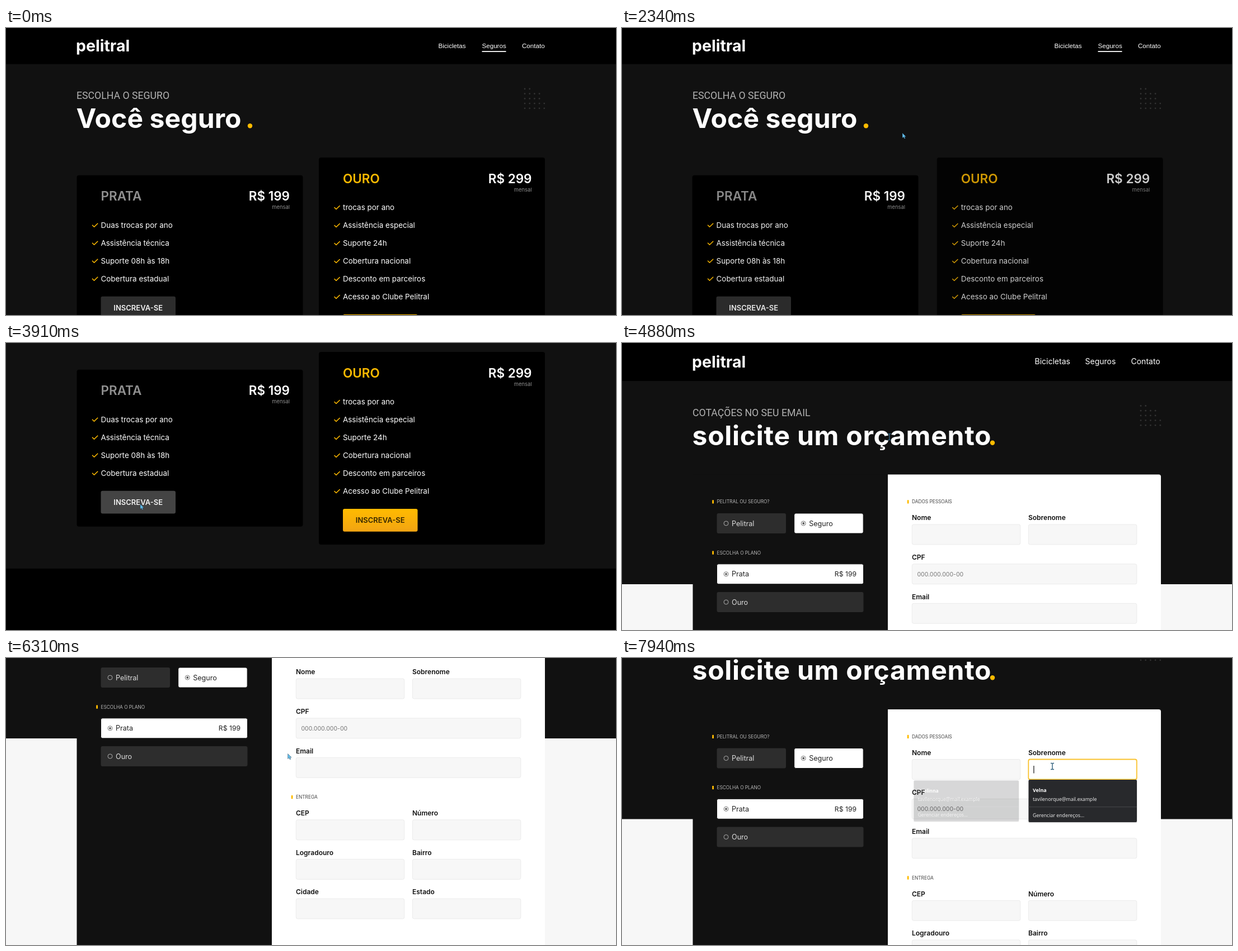
Animation, 1090 px wide and 514 px high, one loop 8 s. Source, as an HTML page:

```html
<!DOCTYPE html>
<html lang="pt-BR">
<head>
<meta charset="utf-8">
<title>Seguros</title>
<style>
html, body { margin: 0; width: 100%; height: 100%; overflow: hidden; background: #111; }
svg { display: block; width: 100%; height: 100%; }
text { font-family: Inter, "Open Sans", sans-serif; white-space: pre; }
.nav { font-family: "Liberation Sans", Arial, sans-serif; }
.kicker { font-family: Roboto, sans-serif; }
.menu text { font-family: "Open Sans", "Noto Sans", sans-serif; }
</style>
</head>
<body>
<svg id="stage" viewBox="0 0 1090 514">
  <defs>
    <linearGradient id="gold" x2="0" y2="1">
      <stop offset="0" stop-color="#fb0"/><stop offset="1" stop-color="#f2a413"/>
    </linearGradient>
  </defs>
</svg>
<script>
const LOOP = 8000;
const GOLD = '#ffbb00';
const stage = document.getElementById('stage');

function add(parent, tag, attrs = {}, content) {
  const el = document.createElementNS('http://www.w3.org/2000/svg', tag);
  for (const k in attrs) el.setAttribute(k, attrs[k]);
  if (content !== undefined) el.textContent = content;
  parent.append(el);
  return el;
}
const group = (parent, attrs) => add(parent, 'g', attrs);
const box = (parent, x, y, width, height, fill, rx = 0, more = {}) =>
  add(parent, 'rect', { x, y, width, height, fill, rx, ...more });
const label = (parent, x, y, size, fill, str, more = {}) =>
  add(parent, 'text', { x, y, 'font-size': size, fill, ...more }, str);
const dot = (parent, cx, cy, r, fill, more = {}) =>
  add(parent, 'circle', { cx, cy, r, fill, ...more });
const SEMI = { 'font-weight': 600 };
const END = { 'text-anchor': 'end' };

function header(page, height, base, top, kicker, title, spacing, dotX) {
  box(page, 0, 0, 1090, height, '#000');
  label(page, 125, base, 28.5, '#fff', 'pelitral', { 'font-weight': 700 });
  label(page, 126, top + 18, 17.7, '#b2b2b2', kicker, { class: 'kicker' });
  label(page, 125.5, top + 70, 48, '#fff', title, { 'font-weight': 650, 'letter-spacing': spacing });
  dot(page, dotX, top + 66.3, 4.2, GOLD);
  [2, 4, 4, 5, 5].forEach((n, row) => {
    for (let col = 0; col < n; col++)
      dot(page, 927 + col * 8.7, top + row * 8.7, 1.4, '#333');
  });
}

// Insurance plans page
const plans = group(stage);
box(plans, 0, 0, 1090, 620, '#111');
box(plans, 0, 620, 1090, 300, '#000');
header(plans, 64.6, 42, 109, 'ESCOLHA O SEGURO', 'Você seguro', 0.1, 436);
[['Bicicletas', 772.5], ['Seguros', 850.5], ['Contato', 922]].forEach(([s, x]) =>
  label(plans, x, 36, 11.6, '#fff', s, { class: 'nav' }));
box(plans, 850.5, 41.2, 43, 1.8, '#fff');

function card(x, y, height, name, color, price, items, btnFill, btnText) {
  const g = group(plans);
  box(g, x, y, 404, height, '#000', 4);
  label(g, x + 43, y + 45.5, 22.5, color, name, SEMI);
  label(g, x + 380.5, y + 45.5, 22.5, '#fff', price, { ...SEMI, ...END });
  label(g, x + 380.5, y + 60.5, 9.4, '#8f8f8f', 'mensal', END);
  items.forEach((s, i) => {
    const cy = y + 89.5 + i * 32;
    add(g, 'path', { d: `M${x + 28} ${cy}l3 3 6.2-6`, fill: 'none', stroke: GOLD,
      'stroke-width': 1.6, 'stroke-linecap': 'round', 'stroke-linejoin': 'round' });
    label(g, x + 43, cy + 4.3, 13.45, '#fff', s);
  });
  const by = y + 89 + items.length * 32;
  const button = box(g, x + 43, by, 133.5, 40.8, btnFill, 3);
  label(g, x + 109.7, by + 25.2, 13, btnText, 'INSCREVA-SE', { ...SEMI, 'text-anchor': 'middle' });
  return { g, button };
}
const silver = card(126.5, 263.7, 281, 'PRATA', '#8f8f8f', 'R$ 199',
  ['Duas trocas por ano', 'Assistência técnica', 'Suporte 08h às 18h', 'Cobertura estadual'],
  '#2d2d2d', '#f2f2f2');
const gold = card(559, 232, 345, 'OURO', GOLD, 'R$ 299',
  ['trocas por ano', 'Assistência especial', 'Suporte 24h', 'Cobertura nacional',
    'Desconto em parceiros', 'Acesso ao Clube Pelitral'],
  'url(#gold)', '#332500');

// Quote form page
const quote = group(stage);
box(quote, 0, 0, 1090, 432, '#111');
box(quote, 0, 432, 1090, 800, '#f7f7f7');
header(quote, 68, 43.5, 112.5, 'COTAÇÕES NO SEU EMAIL', 'solicite um orçamento', 0.75, 662);
[['Bicicletas', 737.5], ['Seguros', 827.5], ['Contato', 909.5]].forEach(([s, x]) =>
  label(quote, x, 38, 14, '#fff', s));
box(quote, 126.5, 235.5, 349, 900, '#111');
add(quote, 'path', { d: 'M475 235.5H959a4 4 0 0 1 4 4V1136H475Z', fill: '#fff' });

function section(x, y, color, str) {
  box(quote, x - 8.3, y - 3, 2.8, 6.2, GOLD);
  label(quote, x, y + 3, 8.3, color, str);
}
function option(x, y, width, name, on, price) {
  const ink = on ? '#222' : '#ddd';
  box(quote, x, y, width, 36, on ? '#fff' : '#2d2d2d', 3, on ? { stroke: '#111' } : {});
  dot(quote, x + 16.5, y + 18, 4, 'none', { stroke: on ? '#777' : '#aaa' });
  if (on) dot(quote, x + 16.5, y + 18, 1.9, '#555');
  label(quote, x + 26.5, y + 22.5, 12.6, ink, name);
  if (price) label(quote, x + 249.5, y + 22.5, 12.2, ink, price, END);
}
section(169.5, 284.3, '#b7b7b7', 'PELITRAL OU SEGURO?');
option(169.5, 305, 123.5, 'Pelitral', false);
option(307.7, 305, 123.5, 'Seguro', true);
section(169.5, 375.5, '#b7b7b7', 'ESCOLHA O PLANO');
option(169.5, 395.8, 262, 'Prata', true, 'R$ 199');
option(169.5, 446, 262, 'Ouro', false);

function field(x, y, width, name) {
  label(quote, x, y - 7.5, 12, '#111', name, SEMI);
  return box(quote, x + .3, y + .3, width, 36, '#f7f7f7', 3, { stroke: '#ebebeb' });
}
section(518, 284.3, '#444', 'DADOS PESSOAIS');
const first = field(518, 324.7, 193.5, 'Nome');
const last = field(726, 324.7, 193.5, 'Sobrenome');
field(518, 395.5, 401.5, 'CPF');
label(quote, 527.5, 417.7, 10.5, '#757575', '000.000.000-00');
field(518, 466, 401.5, 'Email');
section(518, 537, '#444', 'ENTREGA');
[['CEP', 'Número'], ['Logradouro', 'Bairro'], ['Cidade', 'Estado']].forEach((pair, i) =>
  pair.forEach((s, j) => field(518 + j * 208, 577.5 + i * 70.6, 193.5, s)));

const caret = box(quote, 735.3, 336.5, 1.2, 13.5, '#111');

function menu(x, name) {
  const g = group(quote, { class: 'menu' });
  box(g, x, 362.3, 194.5, 76.5, 'rgba(0,0,0,.15)', 2);
  box(g, x + .5, 361.5, 193.5, 76, '#28292c', 2);
  label(g, x + 8, 383.7, 8.8, '#fff', name, { 'font-weight': 700 });
  label(g, x + 8, 399, 8.8, '#f1f1f1', 'tavilenorque@mail.example');
  box(g, x + .5, 409.7, 193.5, 1, '#46474b');
  label(g, x + 8, 428, 8.8, '#f1f1f1', 'Gerenciar endereços...');
  return g;
}
const firstMenu = menu(518, 'Orelinna');
const lastMenu = menu(726, 'Velna');

// Pointers
const arrow = add(stage, 'path', { d: 'M0 0V9L2.2 7.2 3.7 10.3 5.2 9.6 3.8 6.6H6.5Z',
  fill: '#62bdea', stroke: '#123', 'stroke-width': .4 });
const beam = add(stage, 'path', { d: 'M-3-5.5H-1L0-4.8 1-5.5H3M0-5V5M-3 5.5H-1L0 4.8 1 5.5H3',
  fill: 'none', stroke: '#2f5f7c', 'stroke-width': 1.4 });

// Rows: time, value(s)
const SCROLL = [[2410, 0], [2560, 60], [2880, 145], [3000, 145], [3200, 216], [4050, 216],
  [4050, 0], [4960, 0], [5420, 240], [5560, 288], [6420, 288], [6710, 182], [6850, 143.5]];
const POINTER = [[400, 869, 420], [600, 203, 52], [1590, 203, 52], [1760, 148, 0], [1800, 148, -14],
  [2150, 148, -14], [2200, 148, 2], [2340, 501, 188], [2880, 519, 206], [3240, 607, 316],
  [3700, 255, 290], [3980, 235, 288], [4450, 235, 288], [4880, 478, 168], [5050, 440, 190],
  [5420, 407, 204], [6030, 430, 215], [6450, 540, 150], [6710, 559, 136], [6920, 559, 138],
  [7130, 600, 198], [7300, 604, 199], [7670, 767, 193], [7940, 769, 194]];

function sample(rows, t) {
  let i = rows.findIndex(r => r[0] > t);
  if (i < 0) i = rows.length;
  if (i === 0 || i === rows.length) return rows[Math.max(0, i - 1)].slice(1);
  const a = rows[i - 1], b = rows[i];
  const k = (t - a[0]) / (b[0] - a[0]);
  return a.slice(1).map((v, n) => v + (b[n + 1] - v) * k);
}
const ramp = (t, from, to) => Math.min(1, Math.max(0, (t - from) / (to - from)));
const show = (el, on) => el.setAttribute('visibility', on ? 'visible' : 'hidden');
const move = (el, x, y) => el.setAttribute('transform', `translate(${x} ${y})`);

function enter(el, t, from, to, shift) {
  const p = t < 1860 ? 1 : ramp(t, from, to);
  move(el, shift * (1 - p), 0);
  el.setAttribute('opacity', p);
}
function focus(el, on) {
  el.setAttribute('fill', on ? '#fff' : '#f7f7f7');
  el.setAttribute('stroke', on ? '#f9c22e' : '#ebebeb');
  el.setAttribute('stroke-width', on ? 1.8 : 1);
}

function draw(t) {
  const onQuote = t >= 4050;
  const [y] = sample(SCROLL, t);
  show(plans, !onQuote);
  quote.style.display = onQuote ? '' : 'none';
  move(onQuote ? quote : plans, 0, -y);

  enter(silver.g, t, 1880, 2365, -20);
  enter(gold.g, t, 1960, 2440, 18);
  silver.button.setAttribute('fill', t > 3700 && !onQuote ? '#444' : '#2d2d2d');

  const inFirst = t >= 7200 && t < 7790, inLast = t >= 7790;
  focus(first, inFirst);
  focus(last, inLast);
  show(caret, inFirst || inLast);
  move(caret, inFirst ? -208 : 0, 0);

  const gone = ramp(t, 7790, 7900);
  const s = 1 - .03 * gone;
  show(firstMenu, t >= 7260);
  firstMenu.setAttribute('opacity', 1 - .82 * gone);
  firstMenu.setAttribute('transform', `translate(615 399.5) scale(${s}) translate(-615 -399.5)`);
  show(lastMenu, t >= 7850);

  const [px, py] = sample(POINTER, t);
  const text = (t > 4700 && t < 5050) || t >= 6600;
  show(arrow, t >= 400 && !text);
  show(beam, text);
  move(text ? beam : arrow, px, py);
}

const start = performance.now();
function tick() {
  draw((performance.now() - start) % LOOP);
  requestAnimationFrame(tick);
}
tick();
</script>
</body>
</html>
```
